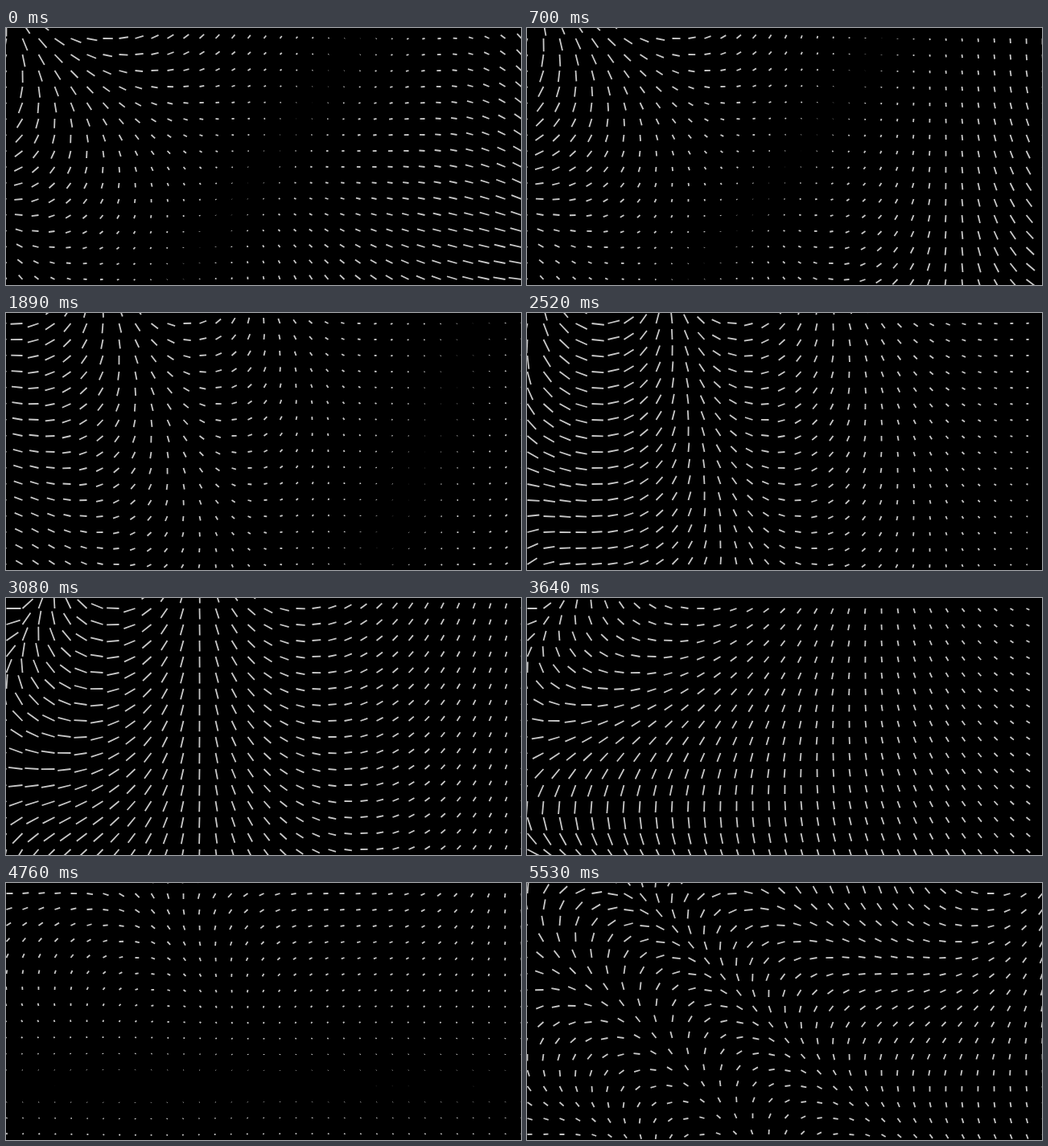
An HTML page with a canvas that plays this animation: 640 by 320 pixels, repeating every 5.6 s.

```html
<!DOCTYPE html>
<html lang="en">
<head>
<meta charset="utf-8">
<title>Flow field</title>
<style>
  html, body { margin: 0; width: 100%; height: 100%; overflow: hidden; background: #000; }
  canvas { display: block; }
</style>
</head>
<body>
<canvas id="stage" width="640" height="320"></canvas>
<script>
const W = 640, H = 320, GAP = 20, TOP = 13, LOOP = 5600, STEP = 70;
const ctx = document.getElementById('stage').getContext('2d');

// Key poses. top, bottom: heading in degrees at the left, middle and right of that edge;
// wave: extra swing across the stage; size: signed line length at the four corners.
const poses = [
  { at: 0,    top: [100, -43, 48],     bottom: [245, 112, 8],      wave: 15,  size: [17, -8, 8, -16] },
  { at: 700,  top: [108, -32, -90],    bottom: [228, 108, -155],   wave: 20,  size: [17, -7.5, 7, -15] },
  { at: 1890, top: [198, -25, -262],   bottom: [195, 98, -228],    wave: 30,  size: [15.5, -1.5, 10, -4] },
  { at: 3080, top: [0, -275, -436],    bottom: [-258, -270, -436], wave: 22,  size: [18, 6, 18, 5] },
  { at: 3640, top: [0, -192, -342],    bottom: [-332, -288, -322], wave: -5,  size: [12, 4, 18, 6] },
  { at: 4760, top: [-360, -252, -275], bottom: [-600, -380, -265], wave: -65, size: [8, 5, -2, -1.3] },
  { at: 5530, top: [-445, -198, -230], bottom: [-722, -515, -291], wave: -70, size: [13.5, 8, 6, 6] }
];

const mix = (a, b, k) => a + (b - a) * k;

// Smooth curve through the value that pick reads from each pose.
function ease(pick, t) {
  const last = poses.length - 1;
  let i = 0;
  while (i < last - 1 && t > poses[i + 1].at) i++;
  const slope = k => {
    const a = poses[Math.max(k - 1, 0)], b = poses[Math.min(k + 1, last)];
    return (pick(b) - pick(a)) / (b.at - a.at);
  };
  const a = poses[i], b = poses[i + 1];
  const h = b.at - a.at, u = (t - a.at) / h, w = 1 - u;
  return w * w * ((1 + 2 * u) * pick(a) + u * h * slope(i)) +
         u * u * ((1 + 2 * w) * pick(b) - w * h * slope(i + 1));
}

const easeList = (key, t) => poses[0][key].map((_, i) => ease(p => p[key][i], t));

// Parabola through three values at u = 0, 0.5 and 1.
const arc = ([a, b, c], u) =>
  a * (2 * u - 1) * (u - 1) + b * 4 * u * (1 - u) + c * u * (2 * u - 1);

function draw(t) {
  const top = easeList('top', t), bottom = easeList('bottom', t);
  const [nw, ne, sw, se] = easeList('size', t);
  const wave = ease(p => p.wave, t);

  ctx.fillStyle = '#000';
  ctx.fillRect(0, 0, W, H);
  ctx.strokeStyle = '#c8c8c8';
  ctx.lineWidth = 1.8;
  ctx.beginPath();
  for (let x = 0; x <= W; x += GAP) {
    const k = x / W;
    const u = k ** 0.72; // the field turns faster towards the left
    const swing = wave * Math.sin(2 * Math.PI * u);
    for (let y = TOP - GAP; y < H; y += GAP) {
      const v = (y - TOP) / (H - GAP);
      const angle = (mix(arc(top, u), arc(bottom, u), v) + swing) * Math.PI / 180;
      const len = mix(mix(nw, ne, k), mix(sw, se, k), v);
      ctx.moveTo(x + 0.5, y);
      ctx.lineTo(x + 0.5 + Math.cos(angle) * len, y + Math.sin(angle) * len);
    }
  }
  ctx.stroke();
}

const start = performance.now();
let shown = -1;
function tick() {
  const t = Math.floor((performance.now() - start) % LOOP / STEP) * STEP;
  if (t !== shown) draw(shown = t);
  requestAnimationFrame(tick);
}
tick();
</script>
</body>
</html>
```
